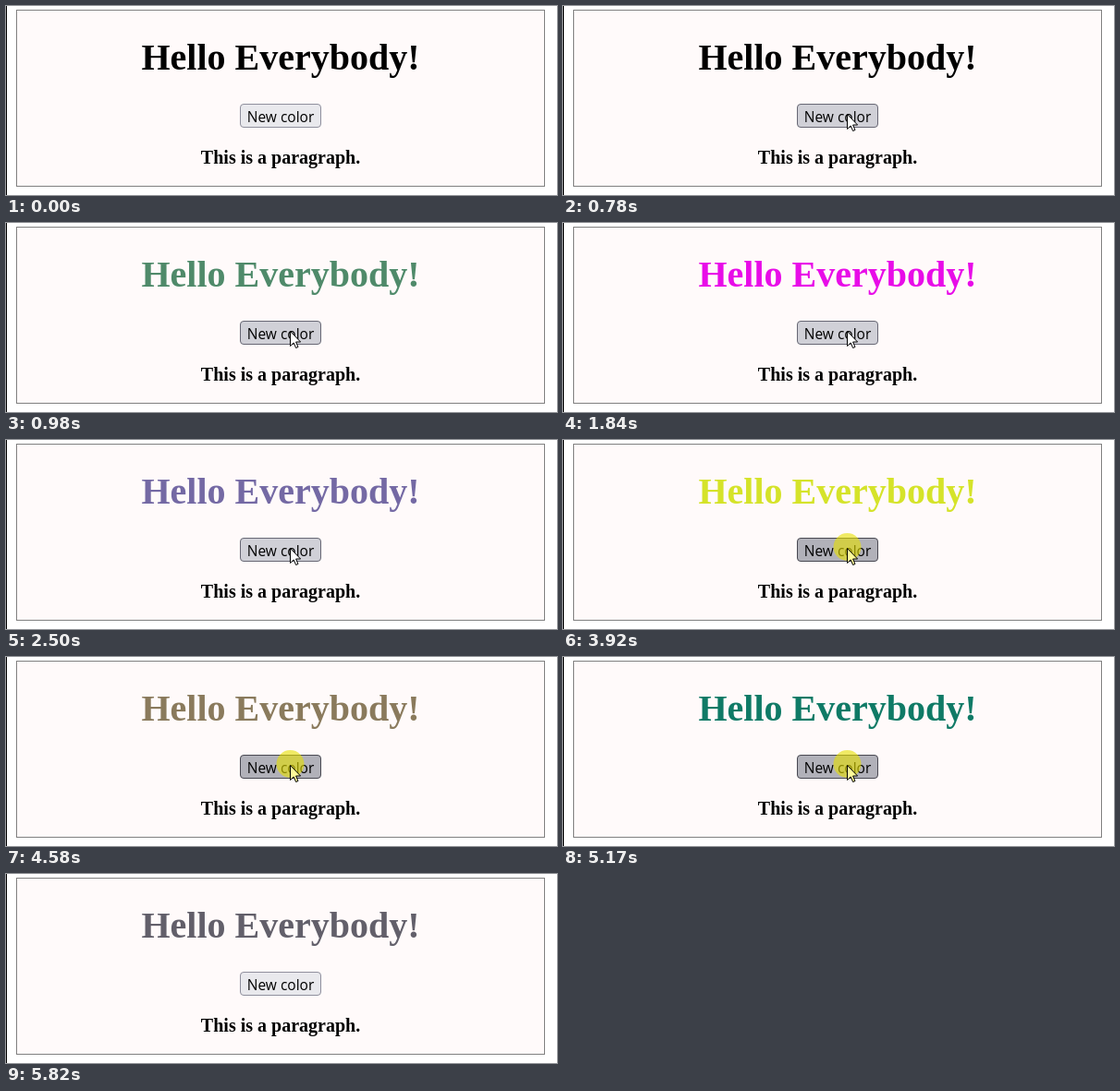
Write an HTML page that moves like this. It is 596 px wide and 205 px high and loops after 6.3 s.

```html
<!DOCTYPE html>
<html lang="en">
<head>
<meta charset="utf-8">
<title>New color</title>
<style>
  html, body { margin: 0; width: 100%; height: 100%; overflow: hidden; background: #fff; }
  svg { display: block; width: 596px; height: 205px; }
  .serif { font-family: "Liberation Serif", "Times New Roman", serif; font-weight: 700; }
  .sans { font-family: "Open Sans", "Noto Sans", sans-serif; font-size: 15.5px; }
  text { text-anchor: middle; }
</style>
</head>
<body>
<svg viewBox="0 0 596 205">
  <rect width="1" height="205"/>
  <rect x="11.5" y="4.5" width="571" height="191" fill="#fffafa" stroke="#808080"/>
  <text id="title" class="serif" x="297" y="69" font-size="40">Hello Everybody!</text>
  <rect id="button" x="253.5" y="106.5" width="87" height="25" rx="3.5"/>
  <text class="sans" x="297" y="126">New color</text>
  <text class="serif" x="297" y="171" font-size="20">This is a paragraph.</text>
  <circle id="halo" cx="307.5" cy="116" r="15" fill="#e6e000" fill-opacity=".6"/>
  <path id="cursor" d="M.5 .5V16.5L4.2 12.9L6.6 18.5L9 17.5L6.6 12H11.6Z" stroke="#000"/>
</svg>
<script>
const LOOP = 6300;
const [title, button, halo, cursor] =
  ["title", "button", "halo", "cursor"].map(id => document.getElementById(id));

// press time, release time, color after the click
const clicks = [
  [860, 960, "#4f8a6a"],
  [1750, 1820, "#e80ce8"],
  [2420, 2500, "#7469a4"],
  [3240, 3320, "#d5e329"],
  [3920, 3980, "#8a7a5c"],
  [4580, 4640, "#0f7a66"],
  [5170, 5250, "#625f6a"]
];

// time, x, y of the pointer tip
const path = [
  [60, 355, 203],
  [680, 315, 131],
  [780, 307, 117],
  [5280, 307, 117],
  [5420, 352, 125],
  [5600, 490, 152],
  [5720, 548, 178],
  [5820, 560, 202]
];

// fill and border of the button
const looks = {
  idle: ["#e9e9ed", "#8f8f9d"],
  hover: ["#d0d0d7", "#676774"],
  active: ["#b1b1b9", "#484851"]
};

function pointerAt(t) {
  const i = path.findIndex(p => p[0] > t);
  if (i < 1) return null;
  const [t0, x0, y0] = path[i - 1], [t1, x1, y1] = path[i];
  const k = (t - t0) / (t1 - t0);
  return [Math.round(x0 + (x1 - x0) * k), Math.round(y0 + (y1 - y0) * k)];
}

const show = (el, on) => el.setAttribute("visibility", on ? "visible" : "hidden");

function draw(t) {
  const tip = pointerAt(t);
  const pressed = clicks.some(([down, up]) => t >= down && t < up);
  const hover = tip && tip[0] >= 253 && tip[0] < 341 && tip[1] >= 106 && tip[1] < 131;
  const [fill, edge] = looks[pressed ? "active" : hover ? "hover" : "idle"];
  const done = clicks.filter(c => t >= c[1]).pop();

  title.setAttribute("fill", done ? done[2] : "#000");
  button.setAttribute("fill", fill);
  button.setAttribute("stroke", edge);
  show(halo, pressed);
  show(cursor, tip);
  if (tip) cursor.setAttribute("transform", `translate(${tip})`);
  cursor.setAttribute("fill", pressed ? "#fffb9a" : "#fff");
}

const start = performance.now();
function tick() {
  draw((performance.now() - start) % LOOP);
  requestAnimationFrame(tick);
}
tick();
</script>
</body>
</html>
```
